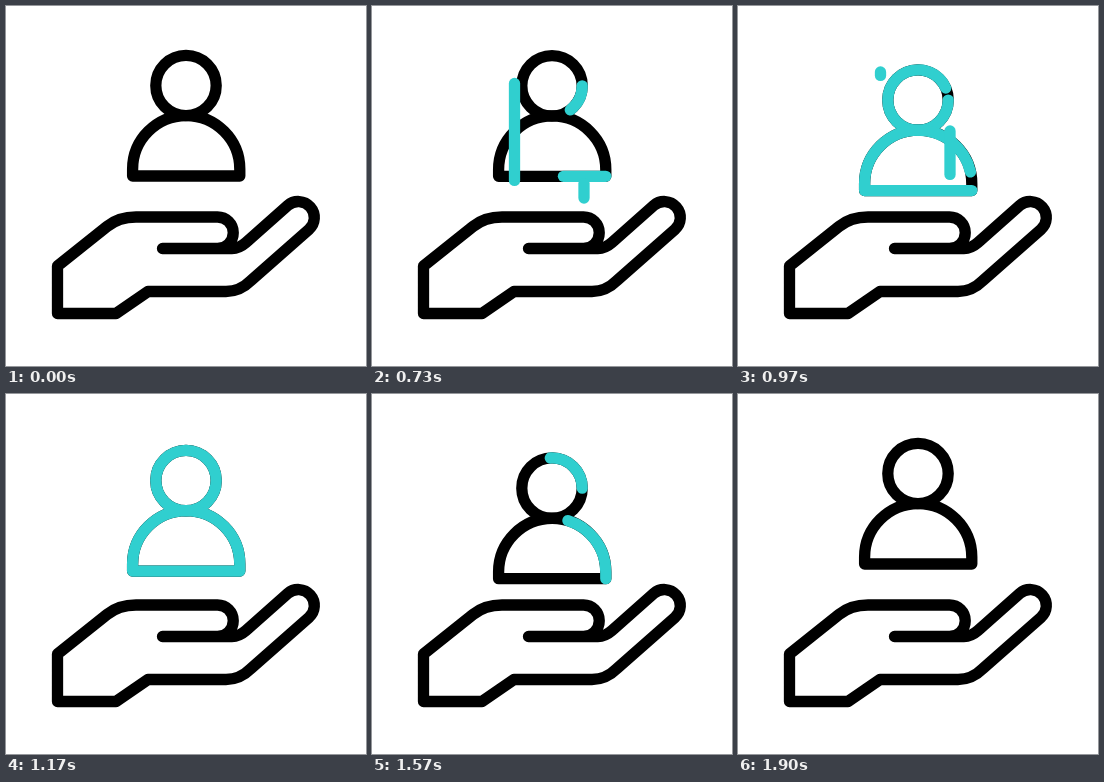
Recreate the animation shown at these times as an HTML page. Size 360 by 360 pixels, loop 2.5 s.

```html
<!DOCTYPE html>
<html lang="en">
<head>
<meta charset="utf-8">
<title>Person above an open hand</title>
<style>
  html, body { margin: 0; width: 100%; height: 100%; overflow: hidden; background: #fff; }
  svg {
    display: block; width: 100%; height: 100%;
    fill: none; stroke: #000; stroke-width: 11.3;
    stroke-linecap: round; stroke-linejoin: round;
  }
  .accent { stroke: #30cfcf; }
</style>
</head>
<body>
<svg viewBox="0 0 360 360">
  <defs>
    <path id="head" pathLength="1" d="M210.2 79.5A30.2 30.2 0 0 1 149.8 79.5A30.2 30.2 0 0 1 210.2 79.5Z"/>
    <path id="body" pathLength="1" d="M233.8 170H126.6V163.2A53.6 53.6 0 0 1 233.8 163.2Z"/>
  </defs>

  <path d="M156.5 242.5H226C232 242.5 236 240 240 236.5L281.7 199.5A16 16 0 0 1 302.9 223.5L245 274.5C238 281.5 230 285.5 220 285.5H142L110 307.5H51.5V260L101 220.5C109 214 119 211 130 211H211.5A15.75 15.75 0 0 1 211.5 242.5"/>

  <g id="person">
    <use href="#head"/>
    <use href="#body"/>
    <g class="accent">
      <use class="outline" href="#head"/>
      <use class="outline" href="#body"/>
    </g>
  </g>

  <g class="accent">
    <path id="left" pathLength="1" d="M142.5 187V66"/>
    <path id="right" pathLength="1" d="M212 192V125"/>
  </g>
</svg>

<script>
  const LOOP = 2500, FPS = 30;
  const BOB = 15.4;
  const bobKeys = [21.2, 30.3, 39.2, 48.2, 57];

  const person = document.getElementById('person');

  // Each stroke grows over "grow" and is erased from its start over "erase" (in ticks).
  const strokes = [
    { sel: '#left', grow: [13.5, 24], erase: [20, 30] },
    { sel: '#right', grow: [19, 29], erase: [25, 35] },
    { sel: '.outline', grow: [19.2, 30.8], erase: [37, 52] }
  ].map(s => ({ ...s, els: document.querySelectorAll(s.sel) }));

  function ease(t, [from, to]) {
    const x = Math.min(1, Math.max(0, (t - from) / (to - from)));
    return x * x * (3 - 2 * x);
  }

  function bob(t) {
    let y = 0;
    for (let i = 0; i < bobKeys.length - 1; i++) {
      const step = BOB * ease(t, [bobKeys[i], bobKeys[i + 1]]);
      y += i % 2 ? -step : step;
    }
    return y;
  }

  function trim(el, start, end) {
    const shown = end - start > 0.0005;
    el.style.display = shown ? '' : 'none';
    if (!shown) return;
    el.style.strokeDasharray = `${end - start} 2`;
    el.style.strokeDashoffset = -start;
  }

  function draw(ms) {
    // Motion advances in whole ticks, 30 per second.
    const t = Math.floor((ms % LOOP + 4) * FPS / 1000);
    person.setAttribute('transform', `translate(0 ${bob(t).toFixed(2)})`);
    for (const s of strokes) {
      const start = ease(t, s.erase), end = ease(t, s.grow);
      s.els.forEach(el => trim(el, start, end));
    }
  }

  function loop() {
    draw(performance.now());
    requestAnimationFrame(loop);
  }

  draw(0);
  requestAnimationFrame(loop);
</script>
</body>
</html>
```
